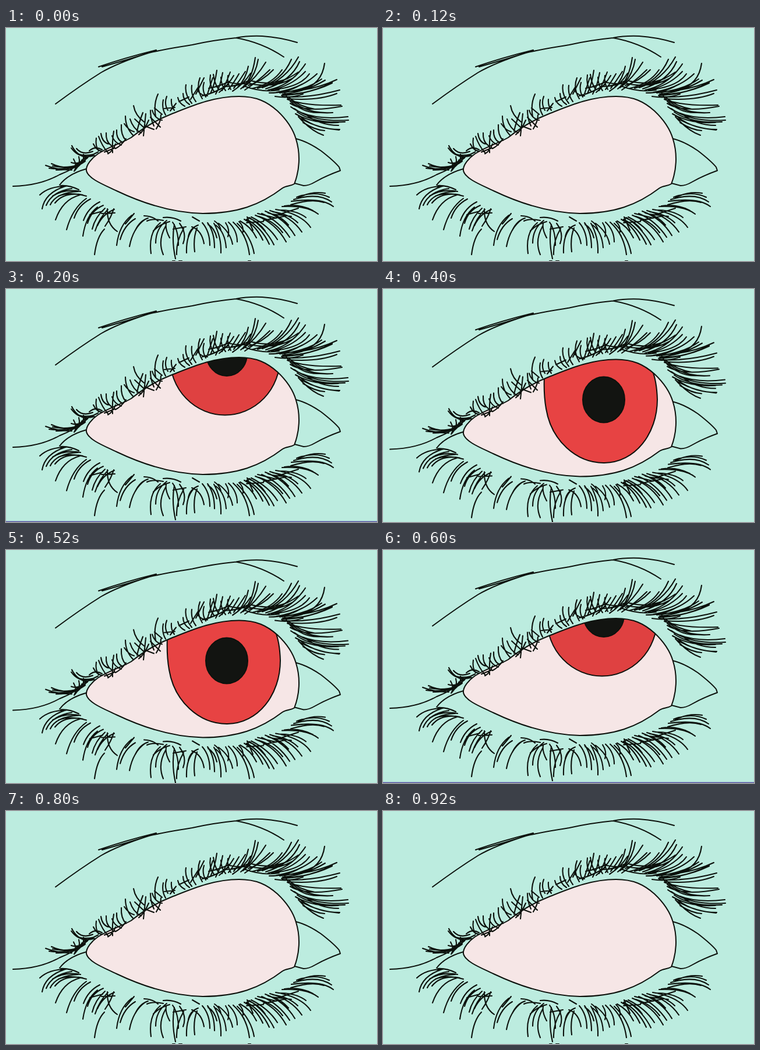
Animation of 637x402 px, one loop 1 s. Source, as an HTML page:

```html
<!DOCTYPE html>
<html lang="en">
<head>
<meta charset="utf-8">
<title>Opening eye</title>
<style>
  html, body { margin: 0; width: 100%; height: 100%; overflow: hidden; background: #bcecdf; }
  svg { display: block; width: 100%; height: 100%; }
  .line, .lash { fill: none; stroke: #0c110c; stroke-linecap: round; stroke-linejoin: round; }
  .line { stroke-width: 2; }
  .lash { stroke-width: 2.1; }
</style>
</head>
<body>
<svg viewBox="0 0 637 402">
  <defs>
    <path id="eye" d="M138 246C137 236 148 224 158 217C176 205 198 199 215 189C231 176 252 161 285 148C318 135 356 118 400 118C430 118 448 127 466 143C484 160 494 178 498 192C506 218 504 246 495 269C488 273 481 272 475 276C436 306 396 320 338 320C282 319 232 301 190 281C167 270 141 260 138 246Z"/>
    <clipPath id="opening"><use href="#eye"/></clipPath>
  </defs>
  <g id="scene">
    <use href="#eye" fill="#f6e6e6"/>
    <g clip-path="url(#opening)">
      <g id="half" class="line">
        <ellipse cx="376" cy="119" rx="94.5" ry="98.5" fill="#df4141"/>
        <ellipse cx="379" cy="112" rx="35" ry="38" fill="#121411"/>
      </g>
      <g id="full" class="line">
        <path fill="#e74343" d="M277 146C276 168 277 186 280 203C289 258 332 297 380 296.500C433 296 471 246 471 187Q470 155 462 136V100H277Z"/>
        <ellipse cx="379" cy="187.500" rx="36" ry="39.500" fill="#121411"/>
      </g>
    </g>
    <use href="#eye" class="line"/>

    <!-- brow and corners -->
    <path class="line" d="M85 131Q128 99 163 77Q192 60 245 43Q270 37 320 29Q355 21 395 17Q415 13 440 14Q470 16 500 25M159 67Q205 51 258 38M165 67Q212 54 258 39M395 17Q440 25 477 50M498 191Q518 196 541 212Q564 230 572 240L574 246Q549 255 530 266Q520 272 511 272L496 268M12 273Q58 272 92 253Q118 243 140 224M92 271Q106 252 138 243"/>

    <!-- upper lashes, left -->
    <path class="lash" d="M68 237q20 8 45 8M74 242q27 4 52-7M78 234q18 9 42 6M86 245q28 1 50-15M80 238q22 5 46-2M113 203q8 17 27 21M117 213q12 10 33 5M112 207q14 20 40 13M121 208q10 12 28 5M116 226q7 12 1 21M125 222q4 12-7 24M133 218q2 14-13 24M155 190q-2 13 4 22M150 200q5 11 15 13M143 212q10-9 22-2M130 228l28-14M108 242q14-4 30-20M112 232q10 4 24-4"/>
    <path class="lash" d="M163 182q2 15 13 18M172 181q-1 15 9 22M159 187q6 17 16 28M185 178q-3 18-2 37M169 214l18-7M182 186q4 12 16 16M190 176q-1 15 9 21M175 217q9-5 13-17M198 167q-1 18 8 27M188 208q10-5 18-17M205 152q0 20 14 34M203 165q8 12 17 14M219 134q3 17 18 28M213 157q5 17 19 24M235 146q-7 18-10 32M221 157l17 16M240 148q-2 19-4 38M228 184q10-8 17-25M248 142q0 15 6 27"/>
    <path class="lash" d="M261 114q-8 17-4 39M251 142q4 14 17 17M270 124q-3 14 4 26M255 138l13 11M248 154l17 17M258 174q8-13 8-24M238 169l16 6M276 118q-5 13 2 24M284 123q-1 11 5 19M272 139l18-2M282 143l10-13M295 120q2 10 12 15M304 113q0 12 11 19M297 127l17-8M309 98q-3 16 10 32M319 99q-2 16 7 28M317 123l13-21M326 114l14-28M333 86q-7 18 4 36M340 94q-4 13 3 25M328 107q7 10 18 10"/>

    <!-- upper lashes, middle -->
    <path class="lash" d="M345 117q5-16 10-31M351 113q8-17 11-40M357 109q-9-11-6-28M360 114q8-13 12-37M365 106q-7-10-9-26M371 108q7-13 14-32M366 111q16-13 25-29M377 108q-8-10-8-23M382 106q9-11 18-27M386 106q-7-12-5-24M391 104q10-13 20-29M389 109q19-12 31-31M398 102q14-14 18-36M403 105q19-13 25-54M407 103q23-17 39-44M410 107q24-16 43-35M414 96q15-17 19-42M348 104q18-3 36-12M337 117q22-5 44-19M376 101q22 0 40-10M384 94q18 4 34 1"/>

    <!-- upper lashes, right -->
    <path class="lash" d="M416 99q24-7 43-27M424 104q34-8 50-32M432 104q42-12 58-50M440 103q40-13 62-53M446 105q44-14 58-47M450 107q40-8 64-45M456 107q36-8 58-32M462 106q44-5 59-27M440 101q35-6 62-25M464 111q44-7 70-32M490 109q51-3 57-48M470 112q46-5 72-24M475 114q40-4 73-24M473 116q43 0 87-22M470 110q54 0 98-21M474 118q44 4 99-11M477 115q44-1 83-20M484 122q52 4 84-9M413 94q28 9 55 2M408 100q33 12 61 7M421 91q31 9 63-4M431 98q34 4 61-11M452 112q30 0 52-13M462 118q26 4 48-4"/>
    <path class="lash" d="M478 111q8 18 25 26M483 123q30 12 92 10M488 130q27 17 89 5M492 127q28 22 69 19M489 136q34 25 98 17M495 139q33 24 93 20M500 145q29 20 82 17M497 148q30 18 74 15M503 151q28 24 70 24M505 156q30 17 67 20M502 153q22 25 43 32M510 163q20 13 37 14M513 148q25 20 58 20M485 119q19 17 45 21M498 134q19 13 40 12"/>

    <!-- lower lashes, left -->
    <path class="lash" d="M62 312q5-28 40-39M58 288q16-15 45-15M69 306q10-24 44-29M76 305q10-21 48-23M80 290q20-13 48-8M84 302q16-20 48-14M90 290q19-8 48 0M94 272q15-1 31 7M85 331q12-35 42-43M104 348q10-37 34-54M117 328q7-22 28-33M132 359q5-35 25-50M133 332q8-22 28-32M140 337q6-22 27-31M148 347q5-21 22-36M153 350q7-22 22-37M157 341q9-20 29-28M152 391q4-31 17-44M170 342q11-16 15-30M191 351q-18-12-17-39M164 320l23-1M144 322l22-6"/>
    <path class="lash" d="M190 375q4-35 26-52M196 365q7-25 26-36M212 377q6-32 27-47M205 338l15-18M222 349q8-17 22-21M237 324q16 1 24 9M242 333q10-5 28-1M249 389q-5-36 16-53M257 371q0-25 19-39M253 350q12-12 28-16M270 391q-10-24 4-49M281 362q-8-15-6-25M291 398q-7-31-2-59M293 391q-1-23 12-45M296 375q0-26-10-40M304 372q7-18-6-35M287 347l22-4M310 388q-1-29 12-43M324 386q-3-23 4-41M313 360q3-15 17-20M270 327q16-2 30 6M320 326l12 7"/>

    <!-- lower lashes, right -->
    <path class="lash" d="M340 372q-4-23-21-29M350 375q0-24-13-39M358 379q0-27-12-43M369 388q1-28-12-51M362 362q-4-17-15-23M378 379q-2-27-18-39M369 349q-2-10-11-16M389 373q-4-21-24-36M381 360q4-12-4-24M397 369q0-20-15-34M409 359q-8-14-19-24M418 391q-4-31-22-50M426 389q-5-29-29-52M407 352q1-11-7-18M430 362q-9-19-28-29M441 366q-11-24-32-36M452 373q-13-29-39-43M460 374q-13-27-42-47M445 350q-11-16-30-23M413 336l29-2M424 349l-10-23"/>
    <path class="lash" d="M466 365q-15-24-45-39M481 369q-18-33-53-46M475 353q-15-20-41-28M487 361q-18-28-48-41M496 358q-17-29-51-42M485 340q-13-16-35-21M508 352q-18-27-55-37M501 336q-15-15-43-19M523 344q-17-24-60-31M515 327q-16-13-47-13M536 321q-19-15-62-13M527 315q-22-12-49-8M562 308q-20-16-72-9M546 301q-22-7-57 4M559 300q-24-17-65-4M555 292q-25-12-56 0M548 285q-24-4-46 8M432 320l32 8M442 332l35-7M456 321l34 4M471 321l31-10"/>
  </g>
  <path id="specks" class="lash" d="M286 402h4M297 402h5M416 402h4"/>
  <rect id="edge" y="400.500" width="637" height="1.500" fill="#5b55a3"/>
</svg>
<script>
  const poses = ["shut", "half", "full", "half", "shut"];
  const part = id => document.getElementById(id);
  const show = (id, on) => part(id).setAttribute("visibility", on ? "visible" : "hidden");

  function draw(now) {
    const pose = poses[Math.floor(now % 1000 / 200)];
    show("half", pose === "half");
    show("edge", pose === "half");
    show("full", pose === "full");
    show("specks", pose === "shut");
    part("scene").setAttribute("transform", `translate(0 ${pose === "full" ? 3.5 : 0})`);
  }

  const start = performance.now();
  function tick() {
    draw(performance.now() - start);
    requestAnimationFrame(tick);
  }
  tick();
</script>
</body>
</html>
```
